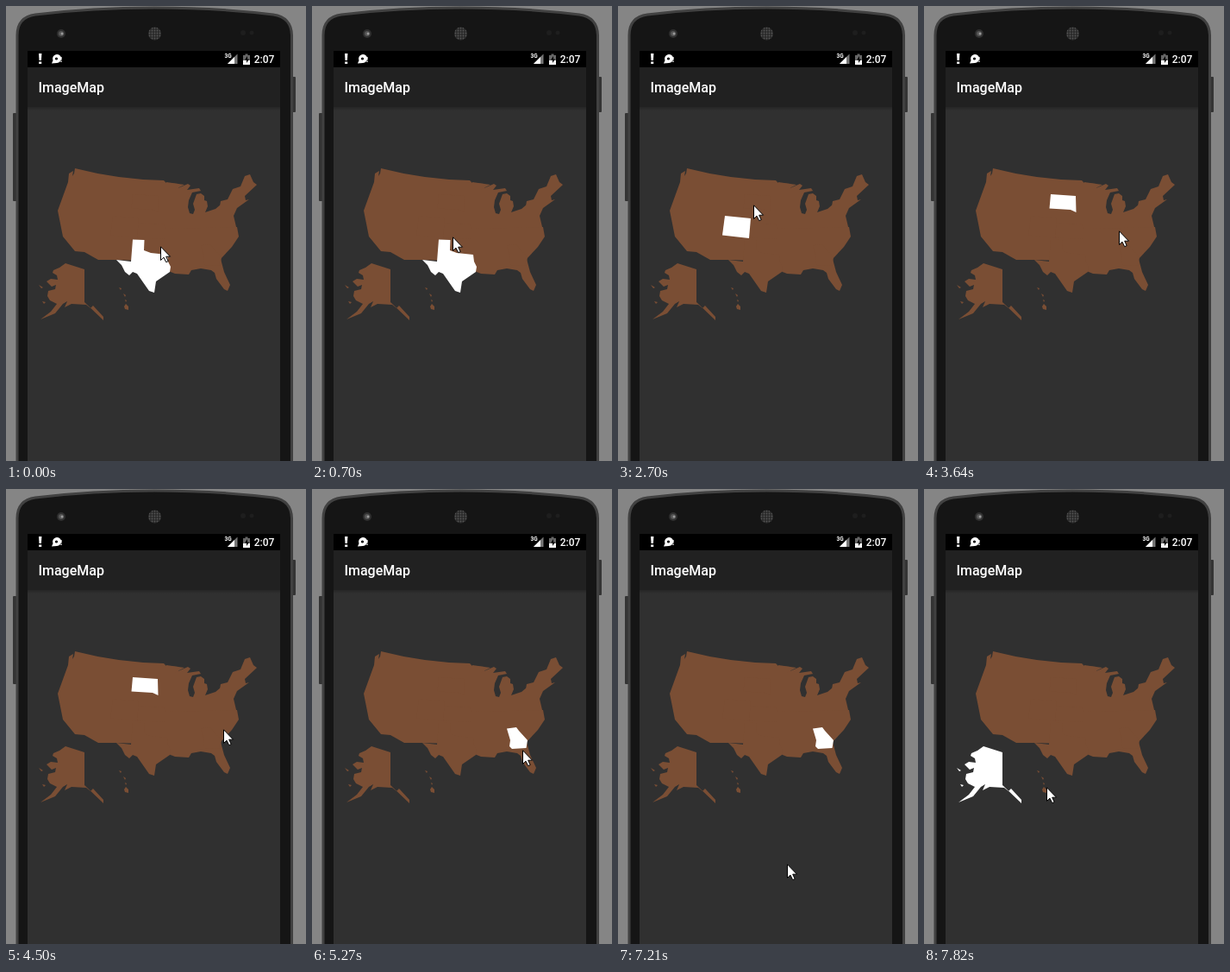
An HTML page for the animation above (8000 ms loop, 348 by 527 pixels).

```html
<!DOCTYPE html>
<html lang="en">
<head>
<meta charset="utf-8">
<title>Image map</title>
<style>
html, body { margin: 0; width: 100%; height: 100%; overflow: hidden; background: #858585; }
svg { display: block; width: 348px; height: 527px; }
text { font-family: Roboto, Arial, sans-serif; font-weight: 500; fill: #fff; }
</style>
</head>
<body>
<svg viewBox="0 0 348 527">
  <defs>
    <linearGradient id="shade" x2="0" y2="1">
      <stop stop-color="#262626"/>
      <stop offset="1" stop-color="#303030"/>
    </linearGradient>
    <pattern id="mesh" width="3" height="3" patternUnits="userSpaceOnUse">
      <rect width="3" height="3" fill="#292929"/>
      <circle cx="1.5" cy="1.5" r=".9" fill="#555"/>
    </pattern>
  </defs>

  <!-- phone -->
  <rect x="8" y="124" width="6" height="102" rx="1" fill="#343434"/>
  <rect x="331" y="82" width="5" height="41" rx="1" fill="#343434"/>
  <path d="M13 530V34Q13 13 34 10Q100 2 172 2T310 10Q331 13 331.5 34V530" fill="#151515" stroke="#414141" stroke-width="3"/>
  <circle cx="64" cy="32" r="5" fill="#303030"/>
  <circle cx="64" cy="32" r="3" fill="#555"/>
  <circle cx="65" cy="32" r="1.5" fill="#999"/>
  <circle cx="172.5" cy="32" r="7.5" fill="url(#mesh)"/>
  <circle cx="275" cy="31" r="3" fill="#1e1e1e"/>
  <circle cx="285" cy="31" r="2.5" fill="#1e1e1e"/>

  <!-- screen -->
  <rect x="25" y="52" width="293" height="475" fill="#303030"/>
  <rect x="25" y="52" width="293" height="19" fill="#000"/>
  <rect x="25" y="71" width="293" height="46" fill="#212121"/>
  <rect x="25" y="117" width="293" height="4" fill="url(#shade)"/>
  <text x="37.5" y="100" font-size="16">ImageMap</text>
  <text x="287.8" y="66" font-size="12">2:07</text>
  <text x="253.5" y="60" font-size="6.5" style="font-weight:700">3G</text>

  <!-- status icons -->
  <path d="M38 55h3.4l-.5 8h-2.4zM38.2 64.5h3v2.5h-3z" fill="#fff"/>
  <path d="M53 66.5L54.5 63A5 5 0 1 1 59 66z" fill="#fff"/>
  <circle cx="58.5" cy="61" r="1.6" fill="#000"/>
  <path d="M64 59v3.5m0 1v1.5" stroke="#fff" stroke-width="1.3"/>
  <path d="M257 67L268.500 55.5V67z" fill="#777"/>
  <path d="M257 67L265 59V67z" fill="#fff"/>
  <path d="M275 57h2.5v-1.5h3V57h2.5v11h-8z" fill="#666"/>
  <path d="M275 63h8v5h-8z" fill="#fff"/>
  <path d="M280 58l-3 4.5h2v3.5l3-4.5h-2z" fill="#000"/>

  <!-- map: west, lakes, northeast, south, islands, then the selectable states -->
  <g fill="#7a4e34">
    <path d="M80 188Q130 201 183 202L186 205 200 206V296L128 294 107 294 91 285 80 284 66 267 60 237 72 204 73 194 78 191 77 197 79 194z"/>
    <path d="M186 204L207 207 195 213 211 206 214 208 210 213 224 211 226 214 216 216 212 225 211 233 213 240 217 241 219 236 217 229 221 218 226 217 230 220V225L233 226 234 232 231 239 243 235 249 230V262H186z"/>
    <path d="M248 232L249 226 257 224 263 212 272 209 277 197 283 195 287 204 291 207 277 220 278 225 282 224 268 234 264 243 268 260 248 262z"/>
    <path d="M186 258L268 256 270 267 262 279 249 293 253 308 260 323 257 330 253 328 244 316 242 309 238 306 226 304 215 306 212 311 196 310 186 306z"/>
    <path d="M131 326l3 1-1 2zM136 333l3 2-1 2zM138 340l2 1-1 2zM139 345l3 3 0 4-4-1-1-3z"/>
    <path id="ak" d="M91 305L69 298 62 303 55 306 54 309 59 312 60 317 52 316 47 319 53 325 58 323 57 328 49 330 48 336 51 341 59 345 52 354 40 363 57 356 66 345 71 342 68 349 76 345 93 346 98 350 101 347 113 360V364L91 343zM38 323l5 3-2 1zM42 342l4 1-2 2z"/>
    <path id="tx" d="M147 270.5L160.5 271 160 283 168 286 187 288 188 296 191 302 190 308 174 319 172 332 166 330 152 310 147 308 143 312 138 308 134 300 128 294 145 296z"/>
    <path id="ks" d="M153 251L183 253 185 258V270L152 268.5z"/>
    <path id="co" d="M124 243L154 246 152 269 121 265.5z"/>
    <path id="sd" d="M147 218L176 220 176.5 239 170 236 145.5 234.5z"/>
    <path id="ga" d="M226 277.5L237 276 240 280 250 291 248.5 300 232 301 229 298 230 291z"/>
  </g>

  <path id="cursor" d="M.5.8V16.5L4 13.2 6.7 18.7 9.2 17.6 6.7 12.2H11.5z" fill="#fff" stroke="#000"/>
</svg>
<script>
const LOOP = 8000;
const START = [179, 278];

// [first step, last step, number of steps, x, y reached]
const moves = [
  [70, 380, 5, 166, 268],
  [700, 700, 1, 163, 267],
  [1460, 1770, 5, 142, 258],
  [2380, 2700, 5, 157, 230],
  [3550, 3720, 3, 250, 270],
  [4500, 4800, 5, 270, 344],
  [5120, 5270, 3, 244, 302],
  [5670, 5820, 3, 213, 422],
  [6050, 6130, 2, 194, 415],
  [6200, 6280, 2, 256, 270],
  [6360, 6360, 1, 225, 248],
  [6430, 6510, 2, 70, 329],
  [6830, 6980, 3, 195, 449],
  [7130, 7210, 2, 196, 434],
  [7280, 7510, 4, 72, 335],
  [7590, 7820, 4, 142, 345]
];

// [time, highlighted state]
const picks = [[0, "tx"], [1535, "ks"], [2460, "co"], [3630, "sd"], [4570, "ga"], [7510, "ak"]];

const byId = id => document.getElementById(id);
const smooth = u => u * u * (3 - 2 * u);

function cursorAt(t) {
  let [x, y] = START;
  for (const [from, to, steps, endX, endY] of moves) {
    if (t < from) break;
    const passed = to > from ? Math.floor((t - from) / (to - from) * (steps - 1) + 0.05) : 0;
    const u = smooth(Math.min(1, (passed + 1) / steps));
    x += (endX - x) * u;
    y += (endY - y) * u;
  }
  return [Math.round(x), Math.round(y)];
}

function draw(now) {
  const t = now % LOOP;
  const active = picks.filter(([from]) => t >= from).pop()[1];
  for (const [, id] of picks) byId(id).setAttribute("fill", id === active ? "#fff" : "#7a4e34");
  byId("cursor").setAttribute("transform", `translate(${cursorAt(t)})`);
}

const begin = performance.now();
function tick() {
  draw(performance.now() - begin);
  requestAnimationFrame(tick);
}
tick();
</script>
</body>
</html>
```
